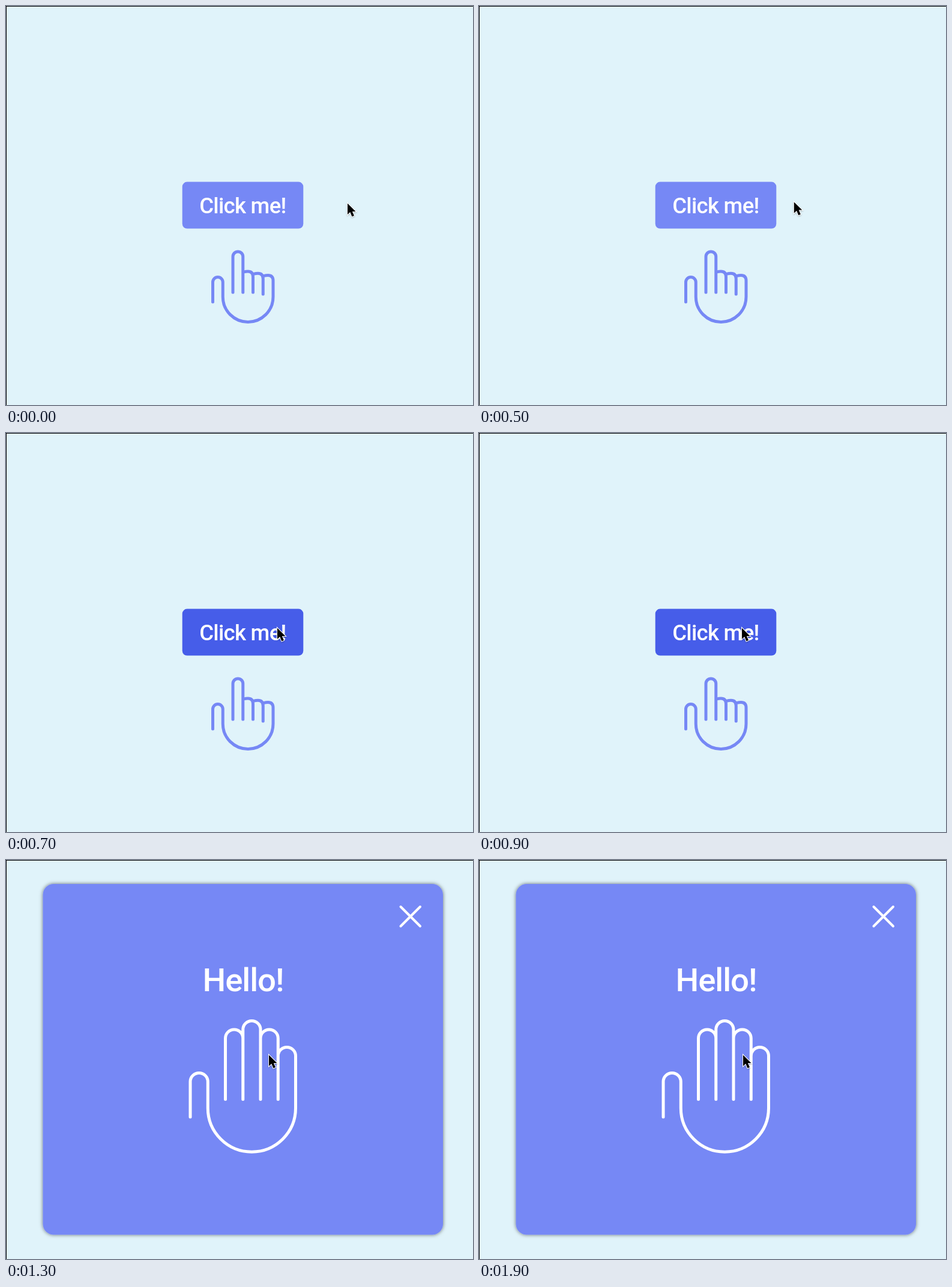
An HTML page for the animation above (2000 ms loop, 778 px wide and 666 px high).

```html
<!DOCTYPE html>
<html lang="en">
<head>
<meta charset="utf-8">
<title>Click me</title>
<style>
  html, body { margin: 0; width: 100%; height: 100%; overflow: hidden; background: #e0f3fa; }
  svg { display: block; width: 778px; height: 666px; }
  text { font: 450 36.5px Roboto, Arial, sans-serif; letter-spacing: -.02em; fill: #fff; text-anchor: middle; }
  .line { fill: none; stroke: #fff; stroke-width: 5; stroke-linecap: round; stroke-linejoin: round; }
</style>
</head>
<body>
<svg viewBox="0 0 778 666">
  <defs>
    <filter id="glow" x="-10%" y="-10%" width="120%" height="120%">
      <feDropShadow dx="0" dy="0" stdDeviation="3.2" flood-color="#000" flood-opacity=".55"/>
    </filter>
    <filter id="soft" x="-50%" y="-50%" width="200%" height="200%">
      <feDropShadow dx="0" dy="1" stdDeviation="1" flood-color="#000" flood-opacity=".3"/>
    </filter>
  </defs>
  <rect width="778" height="666" fill="#e0f3fa"/>

  <g id="start">
    <rect id="button" x="293.7" y="293.6" width="201.6" height="78" rx="8"/>
    <text x="394.4" y="345.5">Click me!</text>
    <path id="pointing" class="line" style="stroke:#7688f5"/>
  </g>

  <g id="dialog">
    <rect x="61.5" y="40" width="666.5" height="585.5" rx="18" fill="#7688f5" filter="url(#glow)"/>
    <path class="line" style="stroke-width:4" d="M657.5 78L690 110.5M690 78L657.5 110.5"/>
    <text x="395" y="219" style="font-size:54.5px">Hello!</text>
    <path id="waving" class="line"/>
  </g>

  <path id="cursor" filter="url(#soft)" stroke="#fff" stroke-width="2" paint-order="stroke"
    d="M0 0V18.5L4.3 14.6L7.4 22L11 20.5L7.9 13.4H13.5Z"/>
  <path d="M0 .5H778M.5 0V666" stroke="#000"/>
</svg>
<script>
  const LOOP = 2000, STEP = 100, HOVER = 700, OPEN = 1300;
  const el = id => document.getElementById(id);
  const show = (id, on) => el(id).setAttribute('visibility', on ? 'visible' : 'hidden');

  // Both hands stand on a grid of columns, one finger width apart.
  const columns = (x, w) => i => x + i * w;
  const arch = (x, w, base, top) => `M${x} ${base}V${top}a${w / 2} ${w / 2} 0 0 1 ${w} 0`;
  const palm = (x, w, base, top, wrist, side) =>
    `${arch(x, w, base, top)}V${wrist}a${2.5 * w} ${2.5 * w} 0 0 0 ${5 * w} 0V${side}`;

  function pointingHand() {
    const w = 16.75, col = columns(344.5, w);
    let d = palm(col(0), w, 494, 461, 485.5, 458) + arch(col(2), w, 478, 418.3) + 'V478';
    for (let i = 0; i < 3; i++) {
      const x = col(i + 4), top = 443 + 3.2 * i;
      d += `M${x - 15} ${top + 1}Q${x - 12} ${top} ${x - 8.5} ${top}q8.5 0 8.5 9V${478 + 3 * i}`;
    }
    return d;
  }

  function wavingHand() {
    const w = 29.25, col = columns(307, w), base = 399.5;
    let d = palm(col(0), w, 429, 370, 414, 327) + `a${w / 2} ${w / 2} 0 0 0 ${-w} 0`;
    for (let i = 2; i < 5; i++) {
      const top = i === 3 ? 283 : 297.5;
      d += arch(col(i), w, base, top) + `V${base}`;
    }
    return d;
  }

  const ramp = (t, from, to) => Math.min(1, Math.max(0, (t - from) / (to - from)));
  const smooth = k => k * k * (3 - 2 * k);

  // Drifts right, glides onto the button, rests, then drifts again.
  function pointerAt(t) {
    const x = 569 + 3 * ramp(t, 0, 300) - 134 * smooth(ramp(t, 300, 800)) + 2 * ramp(t, 1700, 1900);
    const y = 329.5 + ramp(t, 0, 300) - 5 * ramp(t, 300, 600);
    return [x, y];
  }

  function draw(now) {
    const t = Math.floor(now % LOOP / STEP) * STEP;
    el('cursor').setAttribute('transform', `translate(${pointerAt(t)})`);
    el('button').setAttribute('fill', t >= HOVER ? '#465de9' : '#7688f5');
    show('start', t < OPEN);
    show('dialog', t >= OPEN);
  }

  el('pointing').setAttribute('d', pointingHand());
  el('waving').setAttribute('d', wavingHand());

  const began = performance.now();
  function tick() {
    draw(performance.now() - began);
    requestAnimationFrame(tick);
  }
  tick();
</script>
</body>
</html>
```
